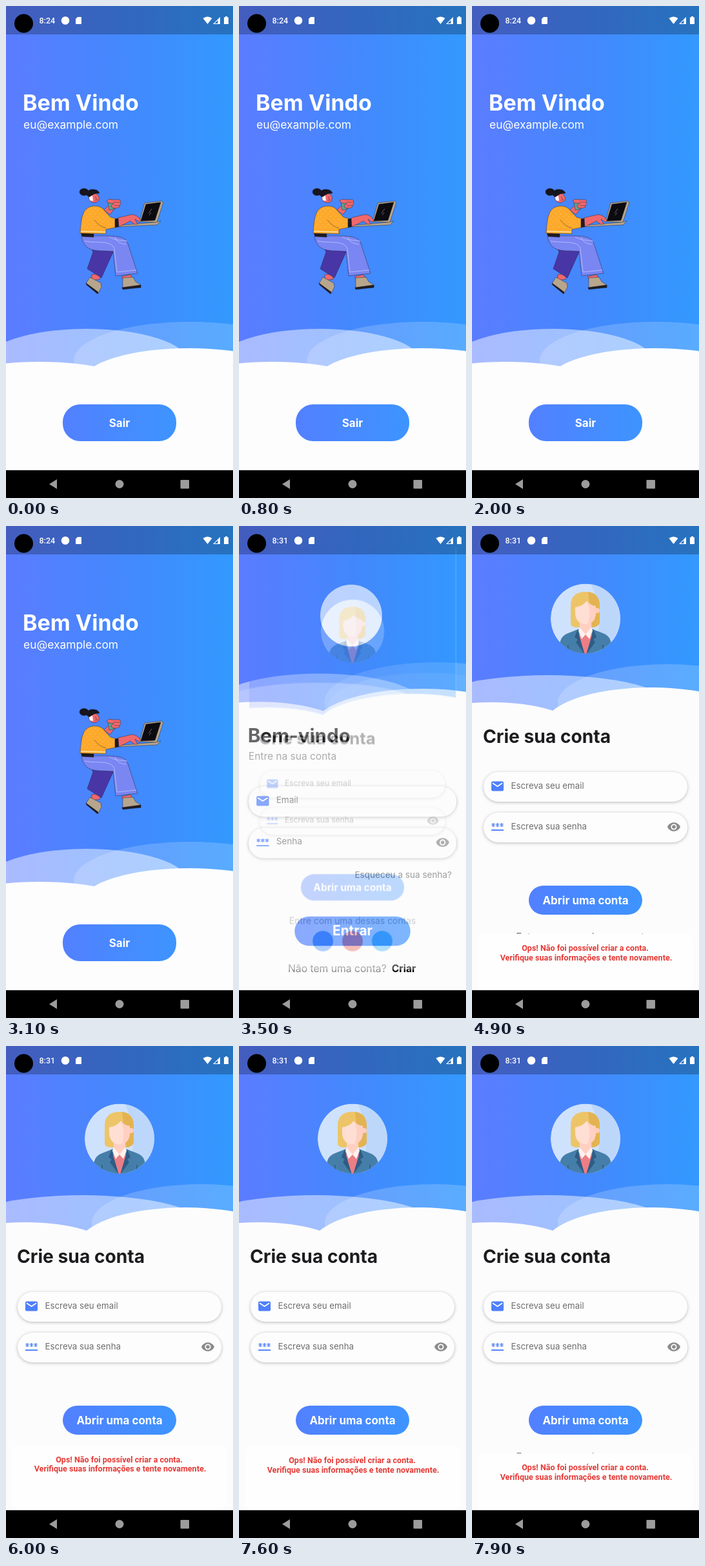
An HTML page that plays this animation: 352 px wide and 762 px high, repeating every 8 s.

```html
<!DOCTYPE html>
<html lang="pt">
<head>
<meta charset="utf-8">
<title>App login</title>
<style>
  html, body { margin: 0; width: 100%; height: 100%; overflow: hidden; background: #000; }
  svg { display: block; width: 352px; height: 762px; }
  text { font-family: Inter, "Open Sans", sans-serif; fill: #6e6e6e; }
  .title { font-size: 28.2px; font-weight: 700; fill: #1c1c1f; }
  .btn { font-size: 17px; font-weight: 700; fill: #fff; text-anchor: middle; }
  .hint { font-size: 13.3px; }
  .note { font-size: 15.4px; fill: #858585; }
  .clock { font: 500 12.5px Roboto, sans-serif; fill: #fff; }
  .error { font: 700 12.55px Roboto, sans-serif; fill: #e53935; text-anchor: middle; }
  .field { fill: #fdfdfd; filter: drop-shadow(0 1px 2.5px rgba(0, 0, 0, .27)); }
  .ink { stroke: #1d1b2c; stroke-width: .45; stroke-linejoin: round; }
</style>
</head>
<body>
<svg viewBox="0 0 352 762">
  <defs>
    <linearGradient id="sky">
      <stop offset="0" stop-color="#5b7cff"/>
      <stop offset=".5" stop-color="#4488fd"/>
      <stop offset="1" stop-color="#3399ff"/>
    </linearGradient>
    <linearGradient id="pill">
      <stop offset="0" stop-color="#5280ff"/>
      <stop offset="1" stop-color="#3d94ff"/>
    </linearGradient>
    <pattern id="dots" width="8" height="8" patternUnits="userSpaceOnUse">
      <circle cx="2" cy="2" r=".6" fill="#ffd583"/>
      <circle cx="6" cy="6" r=".6" fill="#ffd583"/>
    </pattern>
    <clipPath id="disc"><circle cx="176" cy="143.5" r="54"/></clipPath>

    <g id="back">
      <rect width="352" height="719" fill="#fcfcfc"/>
      <rect width="352" height="294" fill="url(#sky)"/>
    </g>
    <g id="mail">
      <rect x="-9.5" y="-7.5" width="19" height="15" rx="2" fill="#4f7ffb"/>
      <path d="M-7.5-4.8 0 .2 7.5-4.8" fill="none" stroke="#fff" stroke-width="1.7"/>
    </g>
    <g id="secret" stroke="#4f7ffb" stroke-width="1.4">
      <path id="star" d="M-6.5-5v6M-9.1-3.5l5.2 3M-9.1-.5l5.2-3"/>
      <use href="#star" x="6.5"/>
      <use href="#star" x="13"/>
      <path d="M-9.5 6h19" stroke-width="1.9"/>
    </g>
    <g id="eye" fill="#8b8b8b">
      <path d="M-10 0C-6.5-9 6.5-9 10 0C6.5 9-6.5 9-10 0Z"/>
      <circle r="4.6" fill="#fdfdfd"/>
      <circle r="2.8"/>
    </g>
    <g id="fields">
      <rect class="field" x="18" y="381" width="316" height="46" rx="23"/>
      <rect class="field" x="18" y="444" width="316" height="46" rx="23"/>
      <use href="#mail" x="39.5" y="403"/>
      <use href="#secret" x="39.5" y="465"/>
      <use href="#eye" x="313" y="466"/>
    </g>
  </defs>

  <g id="welcome">
    <rect width="352" height="719" fill="#fdfdfe"/>
    <rect width="352" height="562" fill="url(#sky)"/>
    <ellipse cx="285" cy="549" rx="180" ry="60" fill="#fff" opacity=".18"/>
    <ellipse cx="125" cy="550" rx="156" ry="50" fill="#fff" opacity=".48"/>
    <g fill="#fdfdfe">
      <ellipse cx="52" cy="591" rx="150" ry="40"/>
      <ellipse cx="284" cy="580" rx="164" ry="50"/>
      <rect y="558" width="352" height="80"/>
    </g>
    <text x="26" y="162" style="font-size:34px;font-weight:700;fill:#fff">Bem Vindo</text>
    <text x="27" y="190" style="font-size:17.4px;fill:#fff">eu@example.com</text>

    <g class="ink">
      <path d="M133 416l12-1 1 8-13 2ZM179 419l14-3 4 7-15 2Z" fill="#f0686c"/>
      <path d="M130 420l17 9 1 6-5 10-19-15Z" fill="#b8a68c"/>
      <path d="M124 429l19 14-1 3-17-14Z" fill="#1d1b22"/>
      <path d="M181 421l16-1 4 7 8 5v4l-28 1Z" fill="#b8a68c"/>
      <path d="M180 436l29-4v4l-28 3Z" fill="#1d1b22"/>
      <path d="M131 372l36 7-19 42-22-14 9-26Z" fill="#4936a6"/>
      <path d="M117 356C119 371 127 378 143 379L166 380 170 418 204 414 188 365C184 358 173 356 157 356Z" fill="#7a86f2"/>
      <path d="M122 364c18 4 42-2 46 12l4 36 30-3M160 358c8 4 16 5 28 6M169 358c2 8 9 10 17 11" fill="none" style="stroke:#d9dcff;stroke-width:.6"/>
      <path d="M116 351l20 2v5l-18-1Z" fill="#1d1b22"/>
      <path d="M152 316l9-9 8 6-8 10Z" fill="#f0686c"/>
      <path id="top" d="M115 352C116 341 116 329 121 319C126 309 142 307 150 314L162 327 172 330 170 343 155 346 155 353Z" fill="#fda92b"/>
      <path d="M118 345V328q5-18 24-16l18 18 9 3-1 8-14 4Z" fill="url(#dots)" stroke="none"/>
      <path d="M116 349l38 1" fill="none" style="stroke:#ffe1a0;stroke-width:1.5"/>
      <path d="M137 331c6 8 11 11 18 13" fill="none"/>
      <path d="M158 303l9-1 1 13-8 1Z" fill="#5f9f92"/>
      <path d="M156 302q3-4 9-2l11 0q3 2 1 4 2 3-1 5 0 4-4 4l-7 0-2-4 4-3-8-1Z" fill="#f0686c"/>
      <path d="M166 304h10M167 309h9" fill="none"/>
      <path d="M173 340l58-5 9-2-6 6-59 3Z" fill="#b8a68c"/>
      <path d="M215 305l26-3 3 2-10 31-27-1Z" fill="#b8a68c"/>
      <path d="M217 307l23-3-9 28-22 1Z" fill="#0b0b10"/>
      <path d="M221 321l5-7M222 324l3-4" fill="none" style="stroke:#c9c9d2"/>
      <path d="M169 330l5-1 1 13-6 1Z" fill="#1d1b22"/>
      <path d="M174 328l21-5q9 0 14 9l-2 3-7-5 4 8-5 0-6-5-18 9Z" fill="#f0686c"/>
      <path d="M128 292q8-4 14 0 4 5 2 9-4 5-11 3-6-4-5-12Z" fill="#f0686c"/>
      <path d="M128 293l6 1 1 8-5-1Z" fill="#fff" stroke="none"/>
      <path d="M139 295v3l2 1M138 301l4-1" fill="none"/>
      <path d="M124 292q3-9 11-8 8 0 10 6-7 0-10 2l-6 4Z" fill="#17151d"/>
      <ellipse cx="121" cy="288" rx="7" ry="5.5" fill="#17151d"/>
    </g>

    <rect x="88" y="617" width="176" height="57" rx="27" fill="url(#pill)"/>
    <text class="btn" x="176" y="651.5">Sair</text>
  </g>

  <g id="login">
    <use href="#back"/>
    <ellipse cx="303" cy="274" rx="170" ry="60" fill="#fff" opacity=".19"/>
    <ellipse cx="125" cy="281" rx="162" ry="50" fill="#fff" opacity=".48"/>
    <g fill="#fcfcfc">
      <ellipse cx="34" cy="314" rx="128" ry="40"/>
      <ellipse cx="282" cy="314" rx="167" ry="60"/>
      <rect y="291" width="352" height="60"/>
    </g>
    <circle cx="174" cy="143" r="47" fill="#f7f9ff"/>
    <text class="title" x="17" y="335.5" style="font-size:29px">Bem-vindo</text>
    <text class="note" x="18" y="361.5" style="font-size:15.2px">Entre na sua conta</text>
    <use href="#fields" y="21.5"/>
    <text class="hint" x="60" y="428">Email</text>
    <text class="hint" x="60" y="490.5">Senha</text>
    <text class="hint" x="327" y="541" text-anchor="end">Esqueceu a sua senha?</text>
    <rect x="88" y="600" width="176" height="44.5" rx="22" fill="url(#pill)"/>
    <text class="btn" x="176" y="629" style="font-size:20.4px">Entrar</text>
    <text class="note" x="78" y="684.5">Não tem uma conta?</text>
    <text class="note" x="235.5" y="684.5" style="font-weight:700;fill:#000">Criar</text>
  </g>

  <rect id="scrim" width="352" height="719"/>

  <g id="signup">
    <use href="#back"/>
    <ellipse cx="303" cy="274" rx="170" ry="60" fill="#fff" opacity=".19"/>
    <ellipse cx="118" cy="279" rx="190" ry="48" fill="#fff" opacity=".48"/>
    <g fill="#fcfcfc">
      <ellipse cx="30" cy="313" rx="129" ry="40"/>
      <ellipse cx="278" cy="310" rx="167" ry="60"/>
      <rect y="286" width="352" height="60"/>
    </g>
    <g clip-path="url(#disc)">
      <circle cx="176" cy="143.5" r="54" fill="#cfe2fd"/>
      <path d="M184 89q24 50 4 110h50V89Z" fill="#bdd7fb"/>
      <path d="M153 152V122q1-20 23-20 21 0 22 20v28q-3 7-12 7h-22q-10 0-11-5Z" fill="#edc568"/>
      <path d="M180 102q17 2 18 20v28q-3 7-12 7Z" fill="#e3b352"/>
      <path d="M167 146h18v22l-9 8-9-8Z" fill="#ffd0c2"/>
      <path d="M136 200V184q1-14 13-18l18-7 9 12 9-12 18 7q12 4 13 18v16Z" fill="#457fa9"/>
      <path d="M167 163l9 6 9-6 1 8-8 28h-4l-8-28Z" fill="#ec7e86"/>
      <path d="M167 157l9 11-6 7-5-13ZM185 157l-9 11 6 7 5-13Z" fill="#fff2ee"/>
      <path d="M164 160l-5 12 5 4-3 4 14 19-9-30ZM188 160l5 12-5 4 3 4-14 19 9-30Z" fill="#2f5c84"/>
      <path d="M149 184v16M203 184v16" stroke="#2f5c84" stroke-width="1.5"/>
      <circle cx="194" cy="131" r="4" fill="#ffcdbd"/>
      <path d="M160 126q12-2 18-10 5 7 14 8v12q-2 16-16 16t-16-16Z" fill="#ffdfd4"/>
      <path d="M178 116q5 7 14 8v12q-2 14-13 16 7-17-1-36Z" fill="#ffd0c2"/>
    </g>
    <text class="title" x="17" y="335.5">Crie sua conta</text>
    <use href="#fields"/>
    <text class="hint" x="60.5" y="406.5">Escreva seu email</text>
    <text class="hint" x="60.5" y="469.5">Escreva sua senha</text>
    <rect x="88" y="557" width="176" height="45" rx="22.5" fill="url(#pill)"/>
    <text class="btn" x="176" y="585.5">Abrir uma conta</text>
    <text x="176" y="641.5" text-anchor="middle" style="font-size:15.2px">Entre com uma dessas contas</text>
    <circle cx="125.5" cy="671" r="17.5" fill="#1877f2"/>
    <circle cx="176" cy="671" r="17.5" fill="#ea4335"/>
    <circle cx="226.5" cy="671" r="17.5" fill="#1da1f2"/>
  </g>

  <g id="snack">
    <rect x="9" y="618" width="334" height="99" rx="12" fill="#fefefe"/>
    <text class="error" x="175.5" y="644.5">Ops! Não foi possível criar a conta.</text>
    <text class="error" x="177" y="659.3">Verifique suas informações e tente novamente.</text>
  </g>

  <rect width="352" height="44" opacity=".25"/>
  <circle cx="27.5" cy="27" r="14.5"/>
  <text class="clock" id="clock" x="51.5" y="27">8:24</text>
  <g fill="#fff">
    <circle cx="92" cy="22.5" r="6.3"/>
    <path d="M111 17h5q1 0 1 1v9q0 1-1 1h-7q-1 0-1-1v-7Z"/>
    <path d="M305.5 19q7-5 14 0l-7 9Z"/>
    <path d="M332 17v11h-11Z"/>
    <path d="M340 16h3v1.5h2V28h-7V17.5h2Z"/>
  </g>
  <path d="M323.5 27l5-5v5Z" fill="#2c6fbd"/>

  <rect y="719" width="352" height="43"/>
  <g fill="#9c9c9c">
    <path d="M67 740.5l12-7.5v15Z"/>
    <circle cx="176" cy="740.5" r="6.5"/>
    <rect x="270.5" y="734" width="13.5" height="13.5" rx="1"/>
  </g>
</svg>
<script>
const LOOP = 8000, STEP = 100;
const LOGIN_AT = 3200;
const ZOOM = { at: 3450, ms: 300 };
const SNACK = { enter: 4412, leave: 7398, ms: 1000, travel: 310 };

const $ = id => document.getElementById(id);
const clamp = v => Math.min(1, Math.max(0, v));
const span = (v, a, b) => clamp((v - a) / (b - a));

function bezier(x1, y1, x2, y2) {
  const at = (a, b, s) => 3 * a * s * (1 - s) ** 2 + 3 * b * s * s * (1 - s) + s ** 3;
  return x => {
    if (x <= 0 || x >= 1) return clamp(x);
    let lo = 0, hi = 1;
    for (let i = 0; i < 30; i++) {
      const mid = (lo + hi) / 2;
      if (at(x1, x2, mid) < x) lo = mid; else hi = mid;
    }
    return at(y1, y2, lo);
  };
}

const zoomIn = bezier(.05, 0, .1333, .06);
const zoomOut = bezier(.2083, .82, .25, 1);
const circOut = bezier(.075, .82, .165, 1);
const zoom = p => p < 1 / 6 ? .4 * zoomIn(p * 6) : .4 + .6 * zoomOut((p - 1 / 6) * 1.2);

function scale(el, s) {
  el.setAttribute("transform", `translate(176 359.5) scale(${s}) translate(-176 -359.5)`);
}
function show(el, opacity) {
  el.style.display = opacity > 0 ? "" : "none";
  el.setAttribute("opacity", opacity);
}

function draw(t) {
  const p = span(t, ZOOM.at, ZOOM.at + ZOOM.ms), z = zoom(p);
  const late = t >= LOGIN_AT;
  show($("welcome"), late ? 0 : 1);
  show($("login"), late && p < 1 ? 1 : 0);
  show($("scrim"), p < 1 ? .6 * span(p, .2075, .4175) : 0);
  show($("signup"), span(p, .125, .25));
  scale($("login"), 1 + .05 * z);
  scale($("signup"), .85 + .15 * z);
  $("clock").textContent = late ? "8:31" : "8:24";

  const shown = t < SNACK.leave
    ? span(t, SNACK.enter, SNACK.enter + SNACK.ms)
    : 1 - span(t, SNACK.leave, SNACK.leave + SNACK.ms);
  show($("snack"), shown > 0 ? 1 : 0);
  $("snack").setAttribute("transform", `translate(0 ${SNACK.travel * (1 - circOut(shown))})`);
}

const start = performance.now();
function tick() {
  const t = (performance.now() - start) % LOOP;
  draw(Math.floor(t / STEP) * STEP);
  requestAnimationFrame(tick);
}
tick();
</script>
</body>
</html>
```
